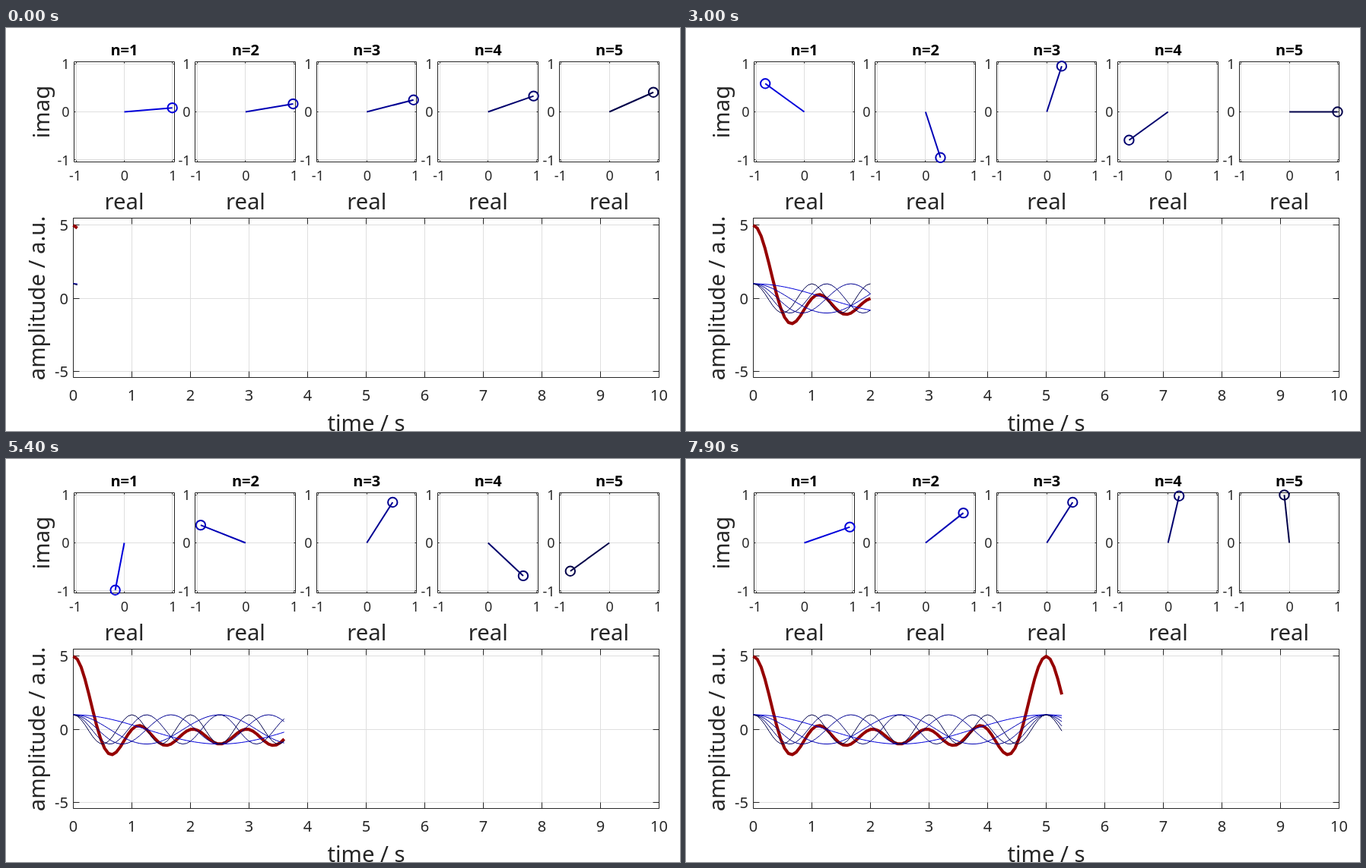
Animation of 886 by 531 pixels, one loop 8000 ms. Source, as an HTML page:

```html
<!DOCTYPE html>
<html lang="en">
<head>
<meta charset="utf-8">
<title>Sum of cosines</title>
<style>
  html, body { margin: 0; width: 100%; height: 100%; overflow: hidden; background: #fff; }
  svg { display: block; width: 886px; height: 531px; }
  text { font-family: "Noto Sans", "Open Sans", sans-serif; fill: #262626; text-anchor: middle; }
  .small { font-size: 18px; }
  .tick { font-size: 20px; }
  .label { font-size: 29.3px; }
  .title { font-size: 20px; font-weight: bold; fill: #000; }
  .end { text-anchor: end; }
  .grid { stroke: #dfdfdf; }
  .axis { stroke: #262626; fill: none; }
  .hand, .curve, .sum { fill: none; }
  .hand { stroke-width: 2; }
  .sum { stroke: #960000; stroke-width: 4; stroke-linejoin: round; }
</style>
</head>
<body>
<svg id="stage" viewBox="0 0 886 531"></svg>
<script>
const stage = document.getElementById("stage");
const COUNT = 5, STEP = 1 / 15, OMEGA = 2 * Math.PI / 5;
const FRAME_MS = 100, FRAMES = 80, RESTART = 18;
const orders = Array.from({ length: COUNT }, (_, i) => i + 1);

function add(tag, attrs, text) {
  const node = document.createElementNS("http://www.w3.org/2000/svg", tag);
  for (const key in attrs) node.setAttribute(key, attrs[key]);
  if (text !== undefined) node.textContent = text;
  return stage.appendChild(node);
}
const label = (x, y, cls, text) => add("text", { x, y, class: cls }, text);
const upright = (x, y, text) =>
  add("text", { class: "label", transform: `translate(${x} ${y}) rotate(-90)` }, text);
const path = (d, cls, stroke) => add("path", stroke ? { d, class: cls, stroke } : { d, class: cls });
const crisp = v => Math.floor(v) + 0.5;
const blue = n => `rgb(0,0,${Math.round(255 * (1 - n / 7))})`;

// Grid, frame and inward ticks of one plot
function axes(left, top, right, bottom, xs, ys, len) {
  let grid = "", ticks = `M${left} ${top}H${right}V${bottom}H${left}Z`;
  for (const x of xs.map(crisp)) {
    grid += `M${x} ${top}V${bottom}`;
    ticks += `M${x} ${top}v${len}M${x} ${bottom}v${-len}`;
  }
  for (const y of ys.map(crisp)) {
    grid += `M${left} ${y}H${right}`;
    ticks += `M${left} ${y}h${len}M${right} ${y}h${-len}`;
  }
  path(grid, "grid");
  path(ticks, "axis");
}

// Phasor plots
const CY = 110.5, UNIT = 63.4;
const centre = n => 155.5 + 159.4 * (n - 1);
for (const n of orders) {
  const cx = centre(n), left = crisp(cx - 66), right = crisp(cx + 65.5);
  const marks = [-1, 0, 1];
  axes(left, 44.5, right, 176.5, marks.map(v => cx + v * UNIT), marks.map(v => CY - v * UNIT), 2);
  label(cx, 36, "title", "n=" + n);
  label(cx, 239, "label", "real");
  for (const v of marks) {
    label(cx + v * UNIT + (v < 0 ? -1 : 0.5), 201, "small", v);
    label(left - 6, CY - v * UNIT + 6.8, "small end", v);
  }
}
upright(57, CY, "imag");

// Time plot
const X0 = 88.5, Y0 = 356.3, SECOND = 77, AMP = 19.27;
const seconds = Array.from({ length: 11 }, (_, i) => i);
const levels = [5, 0, -5];
axes(X0, 250.5, 858.5, 460.5, seconds.map(s => X0 + s * SECOND), levels.map(v => Y0 - v * AMP), 8);
for (const s of seconds) label(X0 + s * SECOND, 491, "tick", s);
for (const v of levels) label(82, Y0 - v * AMP + 7.5, "tick end", v);
label(473.5, 531, "label", "time / s");
upright(51, 356, "amplitude / a.u.");

const sumCurve = path("", "sum");
const waves = orders.map(n => ({
  n,
  curve: path("", "curve", blue(n)),
  hand: path("", "hand", blue(n)),
  ring: add("circle", { r: 6.2, class: "hand", stroke: blue(n) })
}));

const wave = (n, t) => Math.cos(n * OMEGA * t);
const total = t => orders.reduce((sum, n) => sum + wave(n, t), 0);

function trace(steps, fn) {
  if (!steps) return "";
  let d = "";
  for (let i = 0; i <= steps; i++) {
    const t = i * STEP;
    d += `${i ? "L" : "M"}${(X0 + t * SECOND).toFixed(2)} ${(Y0 - fn(t) * AMP).toFixed(2)}`;
  }
  return d;
}

// The trace blanks to time zero once, then resumes where it was
function stepAt(frame) {
  if (frame === RESTART) return 0;
  return frame < RESTART ? frame + 1 : frame;
}

function draw(ms) {
  const steps = stepAt(Math.floor(ms / FRAME_MS) % FRAMES);
  sumCurve.setAttribute("d", trace(steps, total));
  for (const { n, curve, hand, ring } of waves) {
    const angle = n * OMEGA * steps * STEP, cx = centre(n);
    const x = cx + UNIT * Math.cos(angle), y = CY - UNIT * Math.sin(angle);
    curve.setAttribute("d", trace(steps, t => wave(n, t)));
    hand.setAttribute("d", `M${cx} ${CY}L${x} ${y}`);
    ring.setAttribute("cx", x);
    ring.setAttribute("cy", y);
  }
}

const start = performance.now();
function tick() {
  draw(performance.now() - start);
  requestAnimationFrame(tick);
}
tick();
</script>
</body>
</html>
```
